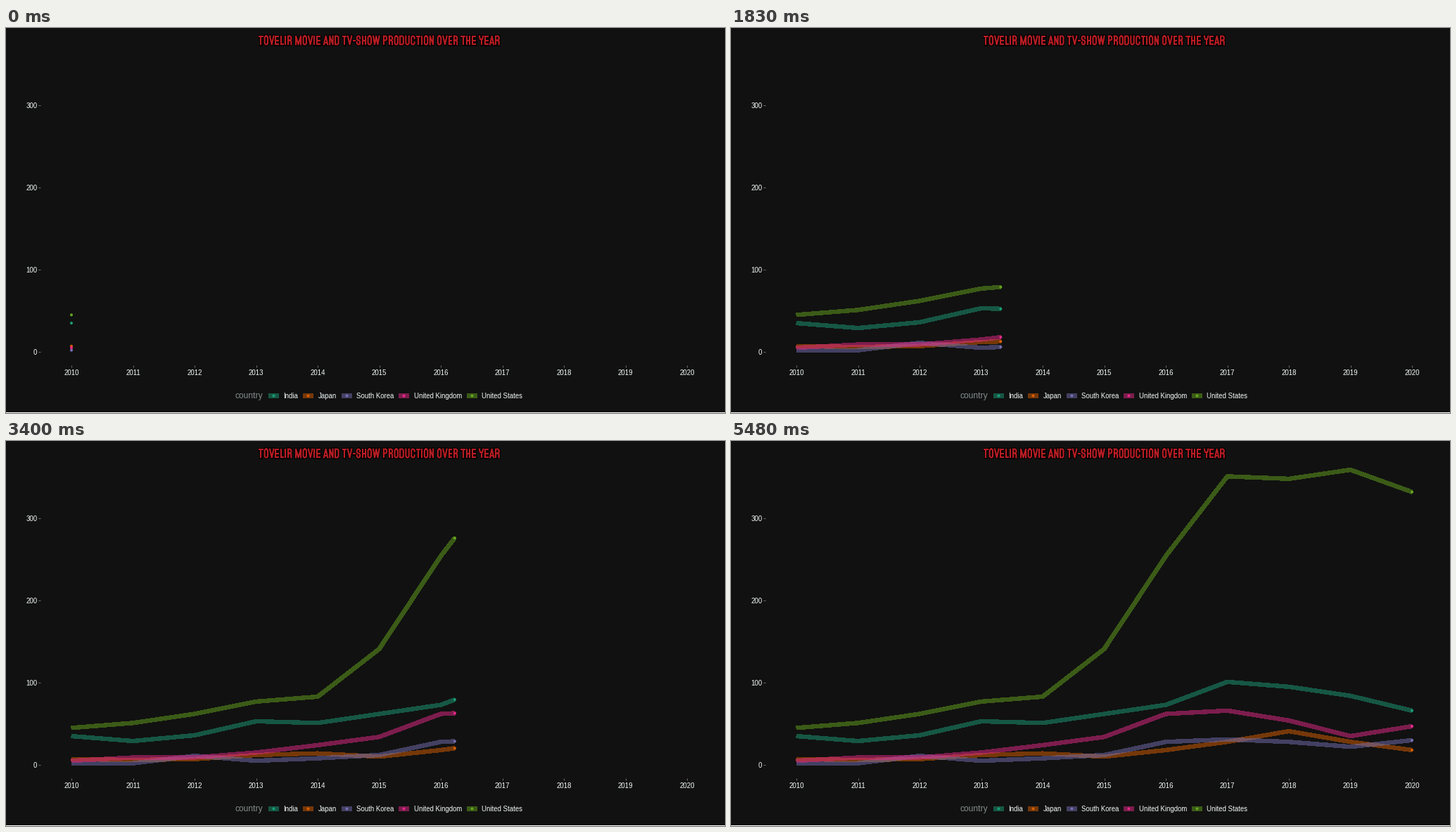
Animation of 1022x548 px, one loop 7 s. Source, as a matplotlib script:

```python
import numpy as np
import matplotlib.pyplot as plt
from matplotlib.animation import FuncAnimation
from matplotlib.collections import LineCollection
from matplotlib.patches import Rectangle

W, H, DPI = 1022, 548, 64
PT = 72 / DPI                      # points per pixel
BG, INK, MUTED, RED = "#111111", "#f4f9f9", "#838b8b", "#b81d24"
FRAMES, INTERVAL, LAST_STEP = 280, 25, 219

# Titles made per year, one value for each of YEARS.
YEARS = np.arange(2010, 2021)
SERIES = {
    "India": ("#1b9e77", [35, 29, 36, 53, 51, 62, 73, 101, 95, 84, 66]),
    "Japan": ("#d95f02", [7, 6, 7, 12, 14, 10, 18, 28, 41, 28, 18]),
    "South Korea": ("#7570b3", [2, 2, 11, 5, 8, 12, 28, 31, 28, 22, 30]),
    "United Kingdom": ("#e7298a", [5, 9, 9, 15, 24, 34, 62, 66, 54, 35, 47]),
    "United States": ("#66a61e", [45, 51, 62, 77, 83, 141, 254, 351, 348, 359, 332]),
}
STEPS = np.round(np.linspace(0, LAST_STEP, len(YEARS)))


def px(year):
    return 93 + 87.5 * (np.asarray(year) - YEARS[0])


def py(value):
    return 461 - 1.17 * np.asarray(value)


fig = plt.figure(figsize=(W / DPI, H / DPI), dpi=DPI, facecolor=BG)
ax = fig.add_axes([0, 0, 1, 1])
ax.set(xlim=(0, W), ylim=(H, 0))
ax.axis("off")


def text(x, y, s, size=9.6, color=INK, ha="left"):
    return ax.text(x, y, s, fontsize=size * PT, color=color, ha=ha,
                   va="baseline", family="Liberation Sans")


# Condensed capitals: each stroke joins named anchors, a to i by rows of three.
ANCHORS = {c: (i % 3 / 2, 1 - i // 3 / 2) for i, c in enumerate("abcdefghi")}
ANCHORS |= {"p": (1, .72), "q": (1, .28), "r": (0, .28),
            "s": (.25, 0), "t": (.75, 0), "u": (.2, .23), "v": (.8, .23)}
LETTERS = {
    "A": "gbi uv", "C": "pcagiq", "D": "ga acig", "E": "ga ac df gi",
    "H": "ga df ic", "I": "hb", "L": "ag gi", "M": "gahci", "N": "gaic",
    "O": "bcigab", "P": "ga acfd", "R": "ga acfd efi", "S": "pcadfigr",
    "T": "ac bh", "U": "agic", "V": "ahc", "W": "asbtc", "Y": "aec eh",
    "-": "df", " ": "",
}
ADVANCE = {"E": 7.2, "T": 7.1, "L": 6.7, "I": 3.6, "M": 10.5, "W": 11.1,
           "-": 4.5, " ": 3.2}
CORNER = np.array([.3, .13])


def stroke(names):
    """Path through the anchors, with right angles cut off."""
    pts = np.array([ANCHORS[c] for c in names])
    path = [pts[0]]
    for before, p, after in zip(pts, pts[1:], pts[2:]):
        if np.dot(before - p, after - p) == 0:
            path += [p + np.sign(before - p) * CORNER, p + np.sign(after - p) * CORNER]
        else:
            path.append(p)
    return np.array(path + [pts[-1]])


def title(s, right, base, cap=14, pen=2.1):
    advances = [ADVANCE.get(c, 7.9) for c in s]
    x = right - sum(advances)
    strokes = []
    for c, adv in zip(s, advances):
        inset = (.2 if c in "ATVWY-" else .7) + pen / 2
        size = np.array([adv - 2 * inset, pen - cap])
        origin = np.array([x + inset, base - pen / 2])
        strokes += [origin + stroke(names) * size for names in LETTERS[c].split()]
        x += adv
    for color, width in (("black", pen + 2.4), (RED, pen)):
        ax.add_collection(LineCollection(
            strokes, colors=color, linewidths=width * PT,
            capstyle="projecting", joinstyle="round"))


title("TOVELIR MOVIE AND TV-SHOW PRODUCTION OVER THE YEAR", 702.5, 24.5)


# Axes
def tick(x, y):
    ax.plot(x, y, color="#707073", lw=PT, solid_capstyle="butt")


for year in YEARS:
    x = px(year)
    tick([x, x], [480, 483])
    text(x, 494, str(year), ha="center")
for value in range(0, 301, 100):
    y = py(value)
    tick([45.5, 48.5], [y, y])
    text(44.3, y + 3.9, str(value), ha="right")
ax.add_patch(Rectangle((0, H - 1), W, 1, color="white", lw=0))


def ribbon(x, y, color):
    return ax.plot(x, y, color=color, alpha=.5, lw=5.3 * PT, antialiased=False,
                   solid_capstyle="butt", solid_joinstyle="round")[0]


def dots(x, y, colors):
    return ax.scatter(x, y, s=(4 * PT) ** 2, c=colors, linewidths=0, zorder=3)


# Legend, each key placed after the label before it
text(325, 527, "country", 12, MUTED)
colors = [color for color, _ in SERIES.values()]
x = 373
for name, color in zip(SERIES, colors):
    ribbon([x, x + 14], [523, 523], color)
    dots([x + 7], [523], [color])
    label = text(x + 21.5, 527, name)
    x += 28.3 + label.get_window_extent().width

# Moving parts
lines = [ribbon([], [], color) for color in colors]
heads = dots([0] * len(colors), [0] * len(colors), colors)


def update(n):
    now = np.interp(n, STEPS, YEARS)
    past = YEARS < now
    tips = []
    for line, (_, values) in zip(lines, SERIES.values()):
        value = np.interp(now, YEARS, values)
        xs = px(np.append(YEARS[past], now))
        ys = py(np.append(np.array(values)[past], value))
        line.set_data(xs, ys)
        tips.append((xs[-1], ys[-1]))
    heads.set_offsets(tips)
    return [*lines, heads]


anim = FuncAnimation(fig, update, frames=FRAMES, interval=INTERVAL,
                     init_func=lambda: update(0), repeat=True, repeat_delay=0)
plt.show()
```
